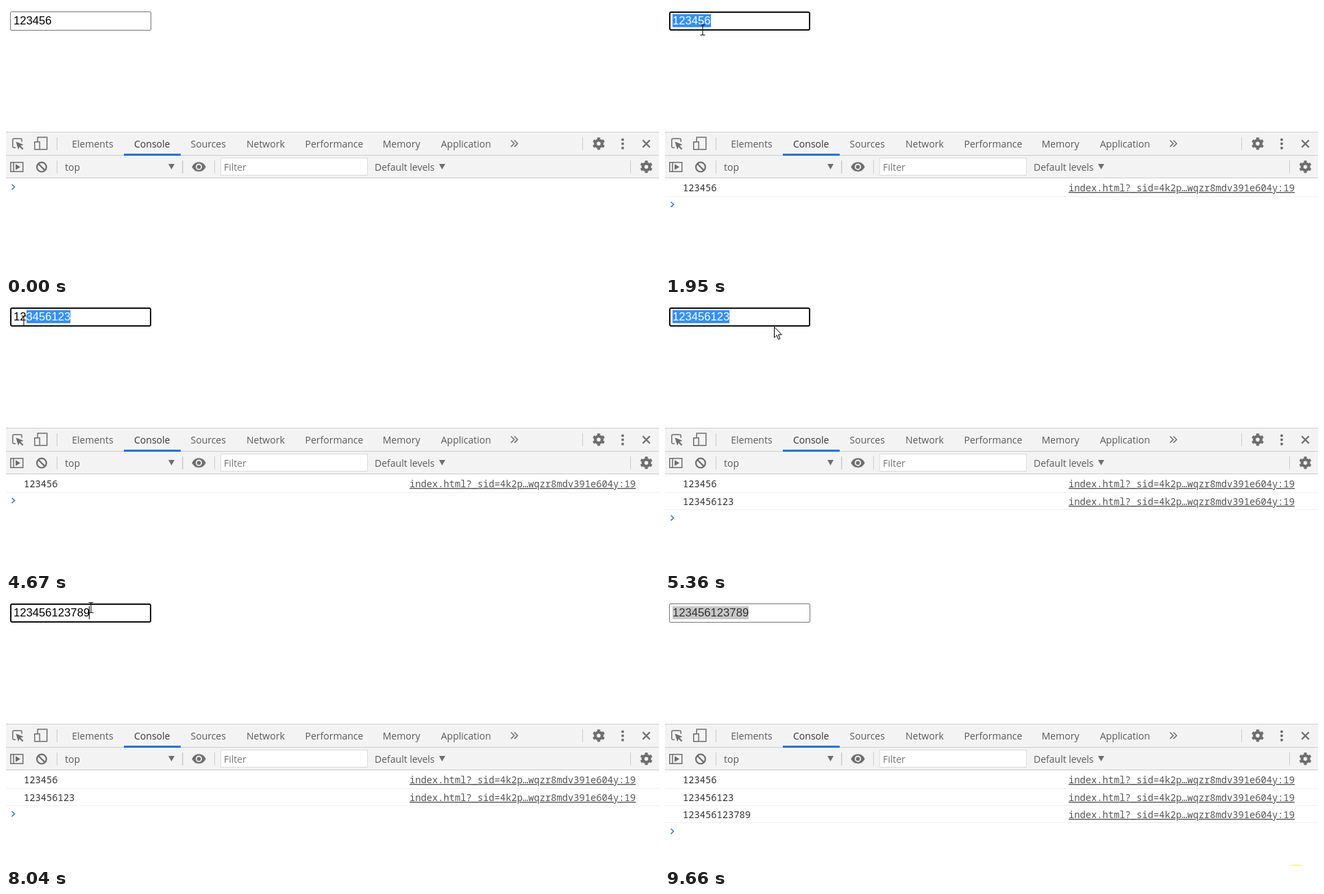
These frames come from a looping animation (953x392 px, 9810 ms). An HTML page:

```html
<!DOCTYPE html>
<html lang="en">
<head>
<meta charset="utf-8">
<title>Console demo</title>
<style>
html, body { margin: 0; width: 100%; height: 100%; overflow: hidden; background: #fff; }
svg { display: block; }
text { white-space: pre; }
.ui { font: 14px "Open Sans", "Noto Sans", sans-serif; fill: #5a5a5a; }
.mono { font: 13.75px "Noto Sans Mono", "DejaVu Sans Mono", monospace; fill: #303030; }
.link { fill: #545454; text-anchor: end; text-decoration: underline 1px; text-underline-offset: 1px; text-decoration-skip-ink: none; }
.field { font: 16.667px "Liberation Sans", Arial, sans-serif; }
.line { fill: none; stroke: #6e6e6e; stroke-width: 1.5; }
.solid { fill: #6e6e6e; }
.sep { fill: #ccc; }
</style>
</head>
<body>
<svg width="953" height="392" viewBox="0 0 953 392">
  <defs>
    <g id="gear">
      <circle r="4.9" fill="none" stroke="#6e6e6e" stroke-width="4.2"/>
      <circle r="7.6" fill="none" stroke="#6e6e6e" stroke-width="3" pathLength="12" stroke-dasharray="1 1" transform="rotate(15)"/>
    </g>
    <path id="drop" class="solid" d="M0 0h9l-4.500 8z"/>
  </defs>

  <rect width="953" height="392" fill="#fff"/>
  <rect id="box" fill="#fff"/>
  <rect id="mark" y="12" height="19"/>
  <text class="field" x="11" y="27"><tspan id="plain"></tspan><tspan id="picked"></tspan></text>
  <rect id="caret" y="12" width="1" height="19"/>

  <rect y="184" width="953" height="68" fill="#f3f3f3"/>
  <path class="sep" d="M0 184h953v1H0zM0 218h953v1H0zM0 251h953v1H0z"/>
  <path class="sep" d="M74 192h1v19h-1zM841 192h1v19h-1zM74 226h1v19h-1zM257 226h1.5v19h-1.5zM304 226h1v19h-1zM911 226h1v19h-1z"/>
  <rect x="172" y="216" width="83" height="3" fill="#1a73e8"/>

  <path class="line" d="M14 207.2h-2.5q-1.7 0-1.7-1.7v-9.7q0-1.7 1.7-1.7h10q1.7 0 1.7 1.7v3"/>
  <path class="solid" d="M14.5 198.5l11 4.2-4.3 1.8 4.3 4.2-1.6 1.6-4.2-4.3-1.8 4z"/>
  <path class="line" d="M46.2 198v-5.9h13.6v17.7H50"/>
  <rect class="line" x="41.8" y="198.8" width="7.4" height="11"/>
  <path class="line" d="M737 196.5l4.7 4.7-4.7 4.7M742 196.5l4.7 4.7-4.7 4.7"/>
  <use href="#gear" x="865" y="201.3"/>
  <g class="solid"><circle cx="900" cy="195.5" r="2"/><circle cx="900" cy="201.6" r="2"/><circle cx="900" cy="207.7" r="2"/></g>
  <path d="M929.3 196.3l10.4 10.4M939.7 196.3l-10.4 10.4" stroke="#6e6e6e" stroke-width="2.3"/>

  <path class="line" d="M6.8 228.8h17.9v13.4H6.8zM11 228.8v13.4"/>
  <path class="solid" d="M14 231.3l7 4.2-7 4.2z"/>
  <g fill="none" stroke="#6e6e6e" stroke-width="2.2"><circle cx="52" cy="235.6" r="6.9"/><path d="M47.2 230.8l9.6 9.6"/></g>
  <use href="#drop" x="237" y="231"/>
  <path class="solid" d="M271.3 235.3q3.5-7 10.2-7t10.2 7q-3.5 7-10.2 7t-10.2-7z"/>
  <circle cx="281.5" cy="235.3" r="3.8" fill="#6e6e6e" stroke="#f3f3f3" stroke-width="1.8"/>
  <rect x="313.5" y="222.5" width="214" height="25" fill="#fff" stroke="#dcdcdc"/>
  <use href="#drop" x="632" y="231"/>
  <use href="#gear" x="934.5" y="235.2"/>
  <g id="labels" class="ui"></g>

  <g id="logs"></g>
  <path id="prompt" d="M8.5 261l4 3.8-4 3.8" fill="none" stroke="#3a76c8" stroke-width="1.5"/>

  <circle id="click" cx="921" cy="410" r="21" fill="#fffb96"/>
  <path id="arrow" d="M.5 .5v15.7l3.6-3.5 2.5 5.8 2.3-1-2.5-5.7h5z" fill="#fff" stroke="#000"/>
  <path id="beam" d="M-3.5-7.5h2.5l1 1 1-1h2.5M0-6.5v13M-3.5 7.5h2.5l1-1 1 1h2.5" fill="none" stroke="#111" stroke-width="1.1"/>
</svg>
<script>
const LOOP = 9810, LEFT = 11, DIGIT = 9.27;
const $ = id => document.getElementById(id);
const set = (el, attrs) => { for (const k in attrs) el.setAttribute(k, attrs[k]); };
const show = (el, on) => { el.style.display = on ? '' : 'none'; };
const add = (parent, name, attrs, text = '') => {
  const el = document.createElementNS('http://www.w3.org/2000/svg', name);
  set(el, attrs);
  el.textContent = text;
  return parent.appendChild(el);
};

const labels = [
  ['Elements', 96.3], ['Console', 187, '#333'], ['Sources', 269.5], ['Network', 351],
  ['Performance', 436.5], ['Memory', 549.7], ['Application', 634.7],
  ['top', 86, '#5a5a5a', 241], ['Filter', 318, '#757575', 241], ['Default levels', 538, '#5a5a5a', 241]
];
for (const [text, x, color = '#5a5a5a', y = 207] of labels)
  add($('labels'), 'text', { x, y, style: `fill:${color}` }, text);

// Each console row appears when a selection is released.
const rows = [[1800, '123456'], [4980, '123456123'], [8500, '123456123789']].map(([time, text], i) => {
  const el = add($('logs'), 'g', {}), y = 271 + Math.round(25.5 * i);
  add(el, 'text', { class: 'mono', x: 26, y }, text);
  add(el, 'text', { class: 'mono link', x: 919, y }, 'index.html?_sid=4k2p…wqzr8mdv391e604y:19');
  add(el, 'rect', { y: 278 + 25 * i, width: 953, height: 1, fill: '#f0f0f0' });
  return { time, el };
});

// Mouse moves: start, end, steps, x, y, cursor
const moves = [
  [530, 920, 6, 240, 42, 'arrow'], [1000, 1080, 2, 118, 22, 'beam'],
  [1250, 1640, 6, -4, 20, 'beam'],
  [1800, 1950, 3, 55, 35, 'beam'], [2030, 2420, 6, 94, 27, 'beam'],
  [4060, 4140, 2, 138, 33, 'beam'],
  [4370, 4370, 1, 147, 36, 'beam'], [4450, 4750, 5, -4, 26, 'beam'],
  [4980, 5360, 6, 159, 36, 'arrow'], [5530, 5830, 5, 159, 21, 'beam'],
  [7960, 7960, 1, 167, 12, 'beam'], [8040, 8270, 4, -4, 18, 'beam'],
  [8500, 8500, 1, -4, 18, 'arrow'], [8580, 8730, 3, 120, 1, 'arrow'],
  [8800, 9260, 7, 943, 330, 'arrow'], [9330, 9410, 2, 922, 400, 'arrow']
];
const typed = [3210, 3290, 3360, 6690, 6840, 7090];
const drags = [[1250, 1800, 2420], [4370, 4980, 5830], [7960, 8500, LOOP]]; // press, release, clear
const blinkStarts = [...typed, ...drags.flatMap(d => [d[0], d[2]])];

function mouseAt(t) {
  let x = 1080, y = 92, kind = 'arrow';
  for (const [start, end, steps, tx, ty, cursor] of moves) {
    if (t < start) break;
    const gap = (end - start) / (steps - 1 || 1) || 1;
    const k = Math.min(steps, Math.floor((t - start + 8) / gap) + 1) / steps;
    x += (tx - x) * k;
    y += (ty - y) * k;
    kind = cursor;
  }
  return { x, y, kind };
}

function draw(t) {
  const mouse = mouseAt(t);
  const value = '123456123789'.slice(0, 6 + typed.filter(s => t >= s).length);
  const n = value.length;
  const focused = t >= 1250 && t < 9660;

  let from = n;
  const drag = drags.find(d => t >= d[0] && t < d[2]);
  if (drag) from = t >= drag[1] ? 0 : Math.max(0, Math.min(n, Math.round((mouse.x - LEFT) / DIGIT)));

  set($('box'), focused
    ? { x: 7, y: 9, width: 204, height: 26, rx: 2, stroke: '#101010', 'stroke-width': 2 }
    : { x: 6.5, y: 8.5, width: 205, height: 27, rx: 1.5, stroke: t >= 1000 && t < 1250 ? '#4f4f4f' : '#767676', 'stroke-width': 1 });
  const markX = Math.round(LEFT + from * DIGIT), endX = Math.round(LEFT + n * DIGIT);
  set($('mark'), { x: markX, width: endX - markX, fill: focused ? '#3390ff' : '#c8c8c8' });
  $('plain').textContent = value.slice(0, from);
  $('picked').textContent = value.slice(from);
  set($('picked'), { fill: focused ? '#fff' : '#323232' });

  const last = Math.max(...blinkStarts.filter(s => s <= t));
  show($('caret'), focused && from === n && (t - last) % 1100 < 550);
  set($('caret'), { x: endX - 1 });

  rows.forEach(r => show(r.el, t >= r.time));
  const count = rows.filter(r => t >= r.time).length;
  set($('prompt'), { transform: `translate(0 ${25.5 * count})` });

  for (const kind of ['arrow', 'beam']) {
    show($(kind), t >= 530 && t < 9410 && mouse.kind === kind);
    set($(kind), { transform: `translate(${Math.round(mouse.x)} ${Math.round(mouse.y)})` });
  }
  show($('click'), t >= 9660);
}

function frame() {
  draw(performance.now() % LOOP);
  requestAnimationFrame(frame);
}
frame();
</script>
</body>
</html>
```
